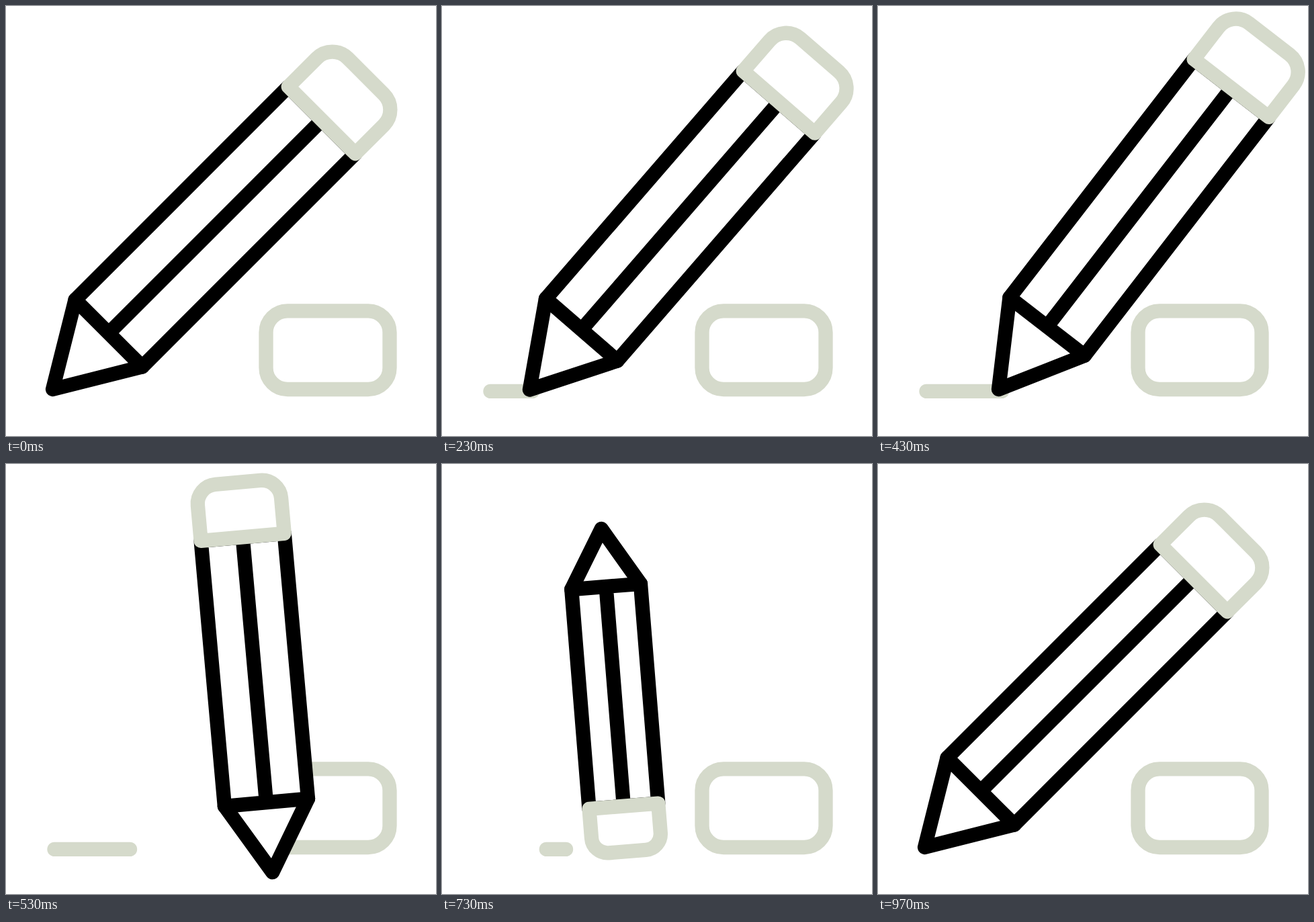
Animation of 640 by 640 pixels, one loop 1.67 s. Source, as an HTML page:

```html
<!DOCTYPE html>
<html lang="en">
<head>
<meta charset="utf-8">
<title>Pencil</title>
<style>
  html, body { margin: 0; width: 100%; height: 100%; overflow: hidden; background: #fff; }
  svg { display: block; width: 100%; height: 100%; }
  .soft { stroke: #d5dacb; }
  .ink { stroke: #000; }
</style>
</head>
<body>
<svg viewBox="0 0 640 640" fill="none" stroke-width="21.33" stroke-linecap="round" stroke-linejoin="round">
  <rect class="soft" x="387" y="453.8" width="184" height="116.7" rx="32"/>
  <path class="soft" id="line"/>
  <g id="pencil" fill="#fff">
    <path class="ink" d="M-70.5 -237V211.5L0 329.5L70.5 211.5V-237Z"/>
    <path class="ink" d="M-70.5 211.5H70.5M0 211.5V-237"/>
    <path class="soft" d="M-70.5 -237V-297a32.5 32.5 0 0 1 32.5 -32.5H38a32.5 32.5 0 0 1 32.5 32.5V-237Z"/>
  </g>
</svg>
<script>
  const LOOP = 1670, FRAME = 100 / 3, LAST = 29;
  const line = document.getElementById('line');
  const pencil = document.getElementById('pencil');

  // Each key: frame, value, slope per frame
  const pose = {
    x: [[0, 302.5, 0], [13, 381, 0], [16, 370.8, -10], [22, 256.5, 0], [25, 313.7, 0], [29, 302.5, 0]],
    y: [[0, 337.5, 0], [13, 309.8, 0], [16, 317.5, -2], [22, 336.5, 0], [25, 330.5, 0], [29, 337.5, 0]],
    turn: [[0, 45, 0], [13, 37.7, 0], [16, -5.1, -21], [22, -184.6, -31.5], [25, -277.9, -19], [29, -315, 0]],
    size: [[0, 1, 0], [13, 1, 0], [16, 0.884, -0.05], [20, 0.697, 0], [22, 0.731, 0.045], [25, 0.878, 0.04], [29, 1, 0]]
  };
  const lineStart = [[20, 72, 0], [23, 184.5, 0]];
  const lineEnd = [[0, 72, 0], [13, 184.5, 0]];

  // Cubic Hermite interpolation, held outside the keys
  function at(keys, f) {
    if (f <= keys[0][0]) return keys[0][1];
    const i = keys.findIndex(k => k[0] > f);
    if (i < 0) return keys[keys.length - 1][1];
    const [fa, a, ma] = keys[i - 1], [fb, b, mb] = keys[i];
    const h = fb - fa, t = (f - fa) / h, u = 1 - t;
    return a + (b - a) * t * t * (3 - 2 * t) + h * (ma * t * u * u - mb * t * t * u);
  }

  function draw(ms) {
    const tick = Math.floor((ms % LOOP) / 10) * 10;
    const f = Math.min(LAST, Math.floor((tick + 5) / FRAME));
    const size = at(pose.size, f);
    pencil.setAttribute('transform',
      `translate(${at(pose.x, f)} ${at(pose.y, f)}) rotate(${at(pose.turn, f)}) scale(${size})`);
    pencil.setAttribute('stroke-width', 21.33 / size);

    const from = at(lineStart, f), to = at(lineEnd, f);
    line.setAttribute('d', to > from ? `M${from} 573.4H${to}` : '');
  }

  const begin = performance.now();
  function loop() {
    draw(performance.now() - begin);
    requestAnimationFrame(loop);
  }
  loop();
</script>
</body>
</html>
```
